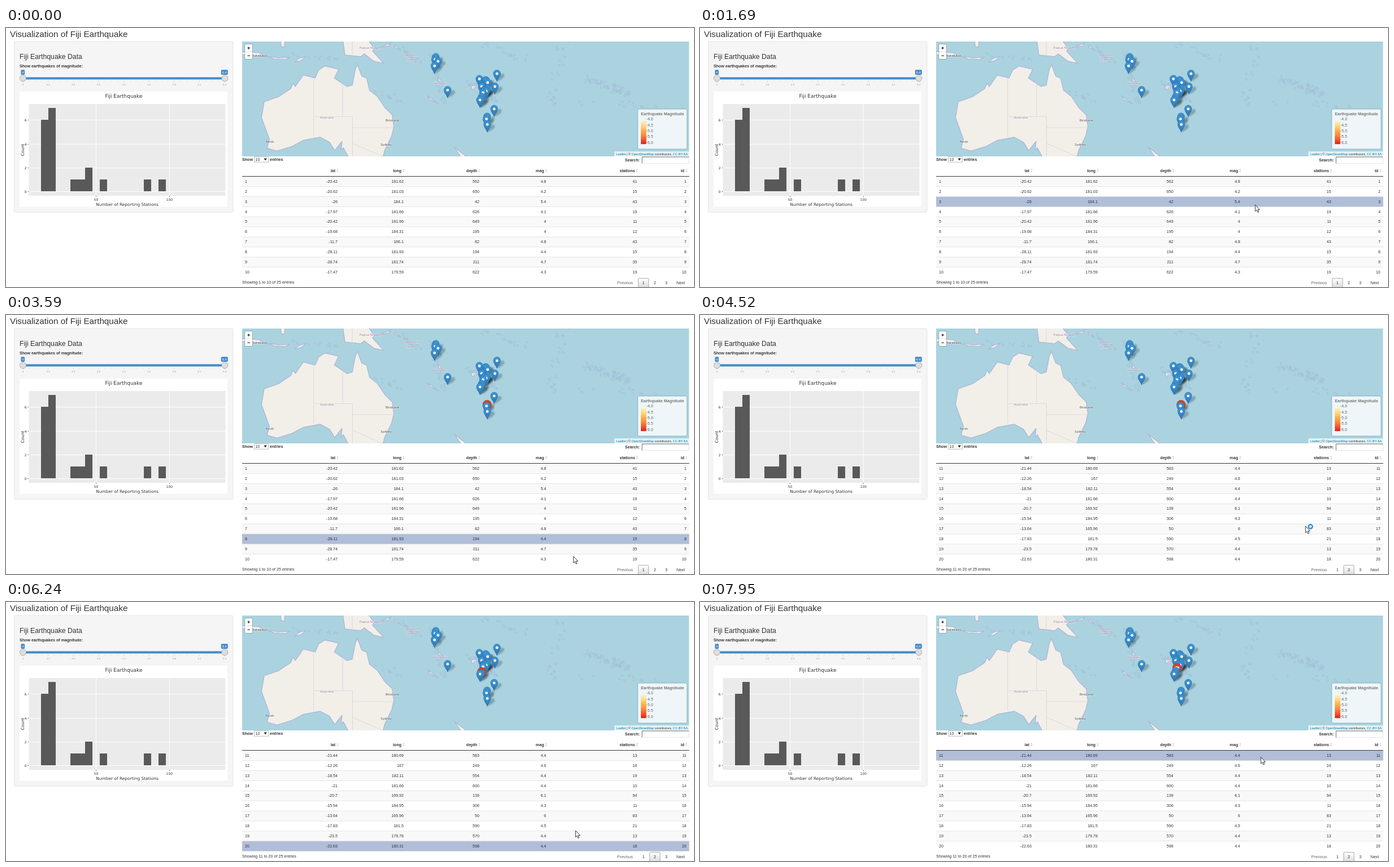
These frames come from a looping animation (1218 px wide and 460 px high, 8 s). An HTML page:

```html
<!DOCTYPE html>
<html lang="en">
<head>
<meta charset="utf-8">
<title>Visualization of Fiji Earthquake</title>
<style>
  html, body { margin: 0; width: 100%; height: 100%; overflow: hidden; background: #fff; }
  svg { display: block; width: 100%; height: 100%; }
  text { font-family: "Liberation Sans", Arial, sans-serif; fill: #333; white-space: pre; }
  .b { font-weight: bold; }
  .e { text-anchor: end; }
  .m { text-anchor: middle; }
  .plot text { font-family: "DejaVu Sans", Verdana, sans-serif; }
  .map .place { font-family: "Noto Sans", sans-serif; text-anchor: middle;
    paint-order: stroke; stroke: #fff; stroke-width: 1.1; stroke-opacity: .6; }
</style>
</head>
<body>
<svg id="stage" viewBox="0 0 1218 460" xmlns="http://www.w3.org/2000/svg"></svg>
<script>
const LOOP = 8000, BODY = 7.14, ROW_TOP = 263.8, ROW_H = 17.88;
const FRAME = 78;        // pointer refresh interval
const HOVER_DELAY = 150; // pointer rest before a row lights up
const FLAG_DELAY = 80;   // row lit before its marker turns red
const PAGE_CLICK = 4200, BUSY_END = 6090;

// lat, long, depth, mag, stations
const quakes = `-20.42 181.62 562 4.8 41|-20.62 181.03 650 4.2 15|-26 184.1 42 5.4 43|-17.97 181.66 626 4.1 19
-20.42 181.96 649 4 11|-19.68 184.31 195 4 12|-11.7 166.1 82 4.8 43|-28.11 181.93 194 4.4 15
-28.74 181.74 211 4.7 35|-17.47 179.59 622 4.3 19|-21.44 180.69 583 4.4 13|-12.26 167 249 4.6 16
-18.54 182.11 554 4.4 19|-21 181.66 600 4.4 10|-20.7 169.92 139 6.1 94|-15.94 184.95 306 4.3 11
-13.64 165.96 50 6 83|-17.83 181.5 590 4.5 21|-23.5 179.78 570 4.4 13|-22.63 180.31 598 4.4 18
-20.84 181.16|-10.98 166.32|-23.3 180.16|-30.2 182|-19.66 180.28`.split(/[|\n]/).map(r => r.split(' '));

// pointer moves: start, end, x, y
const pointerStart = [1069, 377];
const pointerMoves = [[380, 930, 967, 268], [1240, 1470, 983, 314], [1690, 2090, 985, 361], [2240, 2640, 987, 411],
  [2790, 3260, 990, 400], [3430, 3660, 1012, 443], [4040, 4200, 1146, 448], [4280, 4520, 1072, 375],
  [4600, 4830, 1035, 325], [4990, 5270, 1022, 380], [5530, 5930, 1011, 426], [6090, 6630, 992, 286],
  [7400, 7710, 993, 275.5]];

const range = n => [...Array(n).keys()];
const each = (list, f) => list.map(f).join('');
const text = (x, y, s, cls = '', size = BODY, extra = '') =>
  `<text x="${x}" y="${y}" class="${cls}" font-size="${size}" ${extra}>${s}</text>`;
const rect = (x, y, w, h, fill, extra = '') =>
  `<rect x="${x}" y="${y}" width="${w}" height="${h}" fill="${fill}" ${extra}/>`;
const line = (x1, y1, x2, y2, color, w = 1) =>
  `<path d="M${x1} ${y1}L${x2} ${y2}" stroke="${color}" stroke-width="${w}" fill="none"/>`;

const mercator = lat => Math.log(Math.tan(Math.PI / 4 - lat * Math.PI / 360)) * 180 / Math.PI;
const project = (lon, lat) => [864.3 + (lon - 184.1) * 5.82, 81.3 + (mercator(lat) - 13.77) * 5.8].map(v => +v.toFixed(1));

let seed = 7;
const random = () => (seed = (seed * 16807) % 2147483647) / 2147483647;

const gradient = (id, colors) => `<linearGradient id="${id}" x2="0" y2="1">${each(colors, (c, i) =>
  `<stop offset="${i / (colors.length - 1)}" stop-color="${c}"/>`)}</linearGradient>`;
const defs = `<defs><clipPath id="mapClip">${rect(418, 24, 791.5, 204, '#000')}</clipPath>
  ${gradient('heat', ['#fff3bf', '#fed98a', '#feb24c', '#fd8d3c', '#f4572c', '#dd2018'])}
  ${gradient('pinFill', ['#3d97d8', '#2f76b0'])}${gradient('button', ['#fff', '#dcdcdc'])}
  <filter id="soft"><feGaussianBlur stdDeviation=".9"/></filter>
  <filter id="glow" x="-10%" y="-10%" width="120%" height="125%"><feGaussianBlur stdDeviation="1.8"/></filter></defs>`;

function sidebar() {
  const handle = x => `<circle cx="${x}" cy="89.3" r="5.6" fill="#dedede" stroke="#a0a0a0" stroke-width=".8"/>`;
  const badge = (x, w, s) => rect(x - w / 2, 74.3, w, 8.6, '#428bca', 'rx="1.5"') +
    text(x, 80.8, s, 'm', 5.8, 'style="fill:#fff"');
  return rect(14.5, 24, 387.5, 303.3, '#f5f5f5', 'rx="2" stroke="#e3e3e3" stroke-width=".9"') +
    text(24, 55, 'Fiji Earthquake Data', '', 12.24) +
    text(24, 69.7, 'Show earthquakes of magnitude:', 'b') +
    each(range(33), i => line(30 + i * 11.16, 93.5, 30 + i * 11.16, i % 4 ? 95 : 97, '#bbb', .5)) +
    each(range(9), i => text(30 + i * 44.64, 101.8, +(4 + i * .3).toFixed(1), 'm', 4.4, 'style="fill:#999"')) +
    rect(30, 87.4, 357, 4, '#428bca') + handle(30) + handle(387.3) + badge(29.8, 6.6, '4') + badge(386.8, 12, '6.4');
}

function histogram() {
  const counts = [...'67001120100000101'];
  const y = n => Math.round(290.3 - n * 21.2), x = n => 29.8 + n * 2.595;
  return '<g class="plot">' + rect(24, 113, 368, 204.5, '#fff') + rect(40.5, 135, 348, 163, '#ebebeb') +
    each([0, 2, 4, 6], n => line(40.5, y(n) + .5, 388.5, y(n) + .5, '#fff') +
      line(38.7, y(n) + .5, 40.5, y(n) + .5, '#333', .7) + text(36.5, y(n) + 2.5, n, 'e', 5.96)) +
    each([50, 100], n => line(x(n), 135, x(n), 298, '#fff') + line(x(n), 298, x(n), 300, '#333', .7) +
      text(x(n), 307.3, n, 'm', 5.96)) +
    each(counts, (n, i) => rect(62 + i * 13, y(n), 13, y(0) - y(n), '#595959')) +
    text(208.5, 124, 'Fiji Earthquake', 'm', 8.94) +
    text(214.5, 316, 'Number of Reporting Stations', 'm', 7.45) +
    text(0, 0, 'Count', 'm', 7.45, 'transform="translate(32 216.5) rotate(-90)"') + '</g>';
}

// key points of the coast: long, lat
const australia = [142.5, -10.8, 143.8, -14.3, 145.3, -15, 146.2, -18.5, 148.5, -20.2, 150.8, -23.4, 153.1, -25.5,
  153.6, -28.7, 152.9, -31.2, 150.8, -34.8, 149.5, -39, 140.5, -39, 139.7, -36.5, 138.2, -34.2, 137.5, -34.8,
  137.8, -32.6, 135.6, -34.9, 134, -32.8, 131.2, -31.5, 126, -32.3, 122.5, -33.9, 118, -35, 115, -34.3, 115.7, -32,
  113.3, -26.2, 114.1, -21.8, 118.6, -20.3, 122.2, -18, 122.9, -16.4, 123.6, -17.4, 126, -14, 129.6, -14.9,
  130.7, -12.5, 132.6, -11.3, 136.8, -12.3, 135.5, -14.9, 139.3, -17.4, 140.9, -17, 141.8, -12.5];
const islands = 'M596 20L600 48 628 51 634 46 651 59 669 63 649 41 652 36 640 20ZM655 36L677 32 682 26 668 32Z' +
  'M690 31L699 40 688 34ZM418 42L449 44 458 50 418 47ZM461 50l22 3 20-1-8 4-20-1zM511 61l8-7 13-4-10 8z' +
  'M486 20l1 13 6 1 1-14zM746 120L766 135 750 127ZM764 86l10 12-8-4zM824 104q5-4 8 0 0 5-5 5-4-1-3-5z' +
  'M832 99l7-3-4 4zM793 211L817 230 806 230ZM704 41l17 17-9-8z';
// chains of small islands: x1, y1, x2, y2, count, spread
const reefs = [[700, 36, 735, 66, 16, 8], [750, 50, 776, 135, 26, 9], [820, 96, 868, 130, 26, 10],
  [845, 28, 920, 55, 18, 12], [985, 28, 960, 145, 26, 22], [1022, 90, 1105, 118, 60, 14],
  [1015, 135, 1150, 136, 12, 10], [655, 112, 700, 130, 10, 14], [510, 46, 590, 54, 12, 10]];

function reef([x1, y1, x2, y2, count, spread]) {
  return each(range(count), () => {
    const k = random(), stray = () => (random() - .5) * spread;
    const x = x1 + (x2 - x1) * k + stray(), y = y1 + (y2 - y1) * k + stray();
    return `<ellipse rx="${1.2 + random() * 2}" ry="${1 + random()}" transform="translate(${x} ${y}) rotate(35)"/>`;
  });
}

function mapLand() {
  const coast = range(australia.length / 2).map(i => project(australia[2 * i], australia[2 * i + 1]).join(' ')).join('L');
  const place = color => ([s, x, y]) => text(x, y + 2.2, s, 'place', 5.8, `style="fill:${color}"`);
  const regions = [['Papua Niugini', 645, 35], ['Solomon', 718, 48], ['Islands', 718, 55.5], ['Vanuatu', 769, 97.3],
    ['Viti', 831, 105.3], ['Australia', 568, 159.2]];
  const cities = [['Surabaya', 449, 48.3], ['Perth', 467, 202], ['Brisbane', 684, 163.5], ['Sydney', 673, 207]];
  return rect(418, 24, 791.5, 204, '#aad3df') +
    `<g fill="none" stroke="#9aa4cc" stroke-width=".7" opacity=".5">${each(reefs, reef)}</g>
    <path d="M${coast}Z${islands}" fill="#f2efe9" stroke="#b0bcda" stroke-width="1.6" stroke-linejoin="round"/>
    <path d="M544.6 90V193M544.6 157.5H613.5M596 97V157.5M613.5 157.5V228M613.5 177H687M613.5 205L667 228M613 24V52"
      fill="none" stroke="#d6cddb" stroke-width=".7"/>` +
    each(regions, place('#94789f')) + each(cities, place('#444'));
}

function markers() {
  const pins = quakes.map(([lat, lon], i) => ({ id: i + 1, at: project(+lon, +lat) })).sort((a, b) => a.at[1] - b.at[1]);
  const shadow = '<path d="M0 0Q3-11 9-14 14-14 13-9 10-4 0 0Z" fill="#000" opacity=".22" filter="url(#soft)"/>';
  const blue = `<g><path d="M0 0C-1.3-4.2-6.3-9-6.3-14.3A6.3 6.3 0 0 1 6.3-14.3C6.3-9 1.3-4.2 0 0Z" fill="url(#pinFill)" stroke="#2e70a8" stroke-width=".6"/>
    <circle cy="-13.9" r="2.4" fill="#fff"/></g>`;
  const red = `<g><path d="M0 1C-1.6-3-7.8-6-7.8-12.3A7.8 7.8 0 0 1 7.8-12.3C7.8-6 1.6-3 0 1Z" fill="#d63e2a" stroke="#b93624" stroke-width=".5"/>
    <path d="M-3.4-14.5V-7.5" stroke="#fff" stroke-width=".8"/><path d="M-2.7-14.3Q-1-15.2 .6-14.2T3.8-14.3V-10.4Q2-9.6 .6-10.4T-2.7-10.3Z" fill="#fff"/></g>`;
  return each(pins, p => `<g transform="translate(${p.at})">${shadow}</g>`) +
    each(pins, p => `<g id="pin${p.id}" transform="translate(${p.at})">${blue}${red}</g>`);
}

function mapControls() {
  const link = s => `<tspan fill="#0078a8">${s}</tspan>`;
  return rect(422.3, 28, 14.6, 28, '#000', 'rx="2.5" opacity=".2"') + rect(423.2, 29, 12.8, 26, '#fff', 'rx="1.5"') +
    line(423.2, 42, 436, 42, '#ccc', .6) + text(429.6, 38.6, '+', 'b m', 9, 'style="fill:#000"') +
    text(429.6, 51.5, '−', 'b m', 9, 'style="fill:#000"') +
    rect(1119, 144.5, 86, 70, '#000', 'rx="3" opacity=".25" filter="url(#glow)"') +
    rect(1119, 144.5, 86, 70, '#eef6f9', 'rx="2.5"') +
    text(1124, 155, 'Earthquake Magnitude', 'b', BODY, 'style="fill:#777"') + rect(1124, 165, 9.6, 41.2, 'url(#heat)') +
    each(range(5), i => line(1133.6, 162 + i * 10.3, 1135.6, 162 + i * 10.3, '#888', .6) +
      text(1135.8, 164.4 + i * 10.3, (4 + i / 2).toFixed(1), '', BODY, 'style="fill:#666"')) +
    rect(1077, 219.2, 132.5, 9, '#fff', 'opacity=".7"') +
    text(1207, 225.7, `${link('Leaflet')} | © ${link('OpenStreetMap')} contributors, ${link('CC-BY-SA')}`, 'e', 5.6);
}

const columns = [['lat', 587], ['long', 704], ['depth', 838], ['mag', 956.3], ['stations', 1117.3], ['id', 1204.6]];
const rowTop = i => ROW_TOP + i * ROW_H;

function table() {
  const rows = range(10);
  const cells = page => each(rows, i => {
    const id = page * 10 + i + 1, y = rowTop(i) + 11.1;
    return text(423, y, id) + each([...quakes[id - 1], id], (v, c) => text(columns[c][1], y, v, 'e'));
  });
  const pager = page => rect(1119.3 + page * 20.3, 444.5, 18.4, 17, 'url(#button)', 'rx="1" stroke="#979797" stroke-width=".8"') +
    text(418, 454.3, `Showing ${page * 10 + 1} to ${page * 10 + 10} of 25 entries`);
  return text(418, 236.2, 'Show', 'b') + rect(439.5, 228.8, 25, 9.4, '#fff', 'stroke="#a9a9a9" stroke-width=".8"') +
    text(441.5, 236.2, '10') + '<path d="M456.5 231.4h5.4l-2.7 4.2z" fill="#222"/>' + text(467, 236.2, 'entries', 'b') +
    text(1122, 236.7, 'Search:', 'b e') + rect(1126, 229, 83, 11.3, '#fff', 'stroke="#ddd" stroke-width=".8"') +
    '<path d="M1126 240.5V229H1209" fill="none" stroke="#777"/>' +
    each(columns, ([name, x]) => text(x - 3.8, 255.8, name, 'b e') +
      `<path d="M${x - 2} 252.6l1.9-2.5 1.9 2.5zM${x - 2} 254l1.9 2.5 1.9-2.5z" fill="#d0d0d0"/>`) +
    each(rows, i => i % 2 ? '' : rect(418, rowTop(i), 791.5, ROW_H, '#f9f9f9')) +
    rect(418, 0, 791.5, ROW_H, '#b0bed9', 'id="hover"') +
    each(rows.slice(1), i => line(418, rowTop(i), 1209.5, rowTop(i), '#ddd', .7)) + line(418, 263.5, 1209.5, 263.5, '#222', .9) +
    each([0, 1], p => `<g id="page${p}">${cells(p)}${pager(p)}</g>`) +
    text(1082, 454.8, 'Previous', '', BODY, 'style="fill:#666"') +
    each([1, 2, 3], n => text(1108.2 + n * 20.3, 454.8, n, 'm')) + text(1187, 454.8, 'Next');
}

const pointer = `<g id="pointer"><path d="M0 0V11.6L2.6 9.3 4.4 13.4 6.3 12.6 4.5 8.6H8Z" fill="#fff" stroke="#222" stroke-width=".9" stroke-linejoin="round"/>
  <circle id="busy" cx="8.7" cy=".8" r="3.6" fill="#d8eefb" stroke="#2b8fdb" stroke-width="2.3"/></g>`;

const $ = id => document.getElementById(id);
$('stage').innerHTML = defs + rect(0, 0, 1218, 460, '#fff') + text(7, 15.6, 'Visualization of Fiji Earthquake', '', 15.28) +
  sidebar() + histogram() + `<g class="map" clip-path="url(#mapClip)">${mapLand()}${markers()}${mapControls()}</g>` +
  table() + pointer;

const show = (el, on) => el.setAttribute('display', on ? 'inline' : 'none');
const pageAt = t => t >= PAGE_CLICK ? 1 : 0;

function pointerAt(t) {
  let [x, y] = pointerStart;
  for (const [start, end, nx, ny] of pointerMoves) {
    if (t < start) break;
    const steps = Math.round((end - start) / FRAME);
    const k = Math.min(1, Math.floor((t - start) / (end - start) * steps + 1e-6) / steps);
    x += (nx - x) * k;
    y += (ny - y) * k;
  }
  return [x, y];
}

// Places where the pointer stays long enough: when the row lights up and its number, 0 outside the rows
const rests = pointerMoves.flatMap(([, end, , y], i) => {
  const time = end + HOVER_DELAY, next = pointerMoves[i + 1];
  if (next && next[0] < time) return [];
  const row = Math.floor((y - ROW_TOP) / ROW_H) + 1;
  return [{ time, row: row > 10 ? 0 : row + pageAt(end) * 10 }];
});
const lastRest = (t, list = rests) => list.filter(r => r.time <= t).pop()?.row ?? 0;

function draw(t) {
  const page = pageAt(t), row = lastRest(t);
  const flagged = lastRest(t - FLAG_DELAY, rests.filter(r => r.row));
  show($('page0'), page === 0);
  show($('page1'), page === 1);
  show($('hover'), row > 0);
  $('hover').setAttribute('y', rowTop((row + 9) % 10));
  quakes.forEach((_, i) => {
    const [blue, red] = $('pin' + (i + 1)).children;
    show(blue, flagged !== i + 1);
    show(red, flagged === i + 1);
  });
  show($('pointer'), t >= pointerMoves[0][0]);
  show($('busy'), t >= PAGE_CLICK && t < BUSY_END);
  $('pointer').setAttribute('transform', `translate(${pointerAt(t)})`);
}

const begin = performance.now();
function tick() {
  draw((performance.now() - begin) % LOOP);
  requestAnimationFrame(tick);
}
tick();
</script>
</body>
</html>
```
